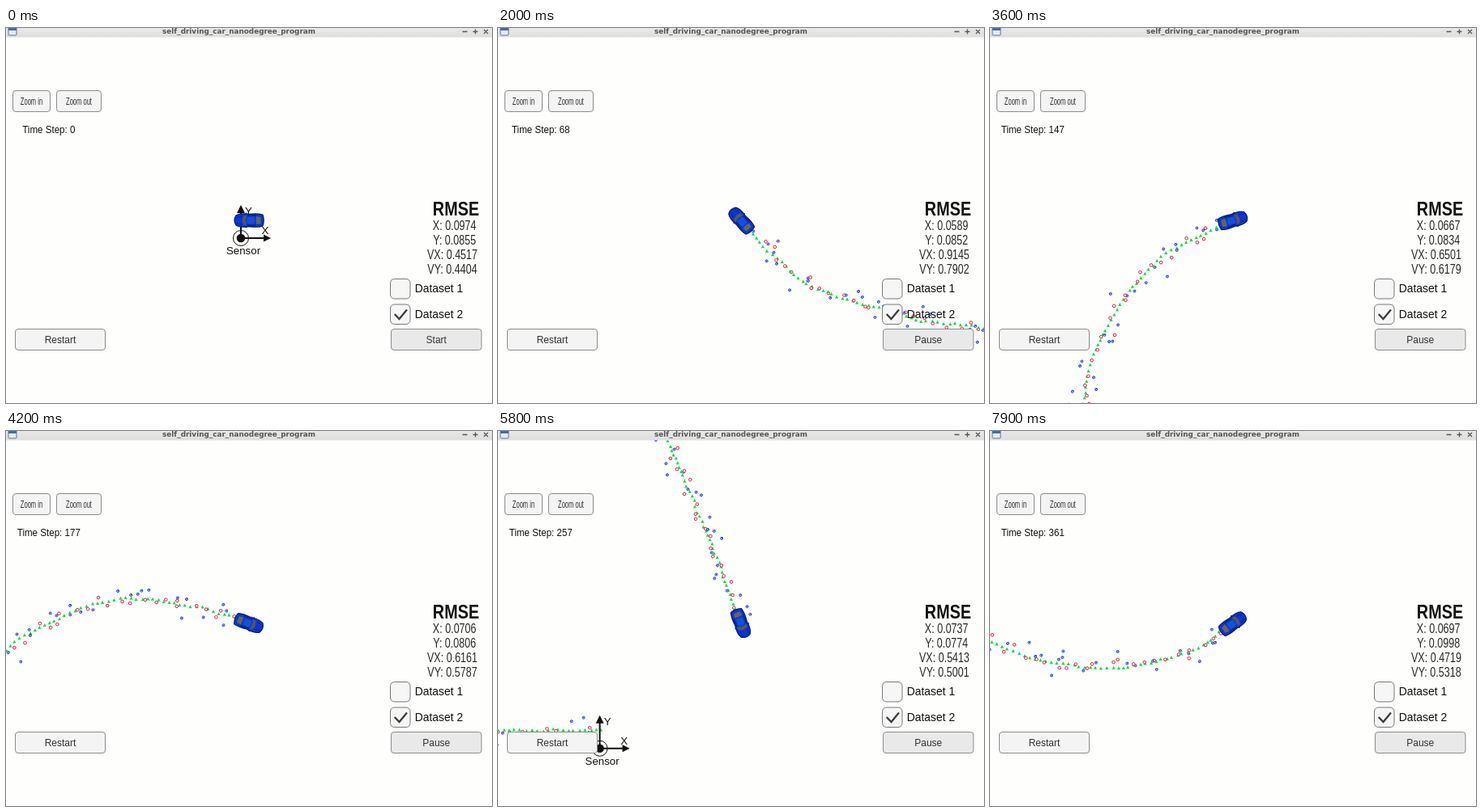
Write an HTML page with a canvas that moves like this. It is 600 by 464 pixels and loops after 8000 ms.

```html
<!DOCTYPE html>
<html lang="en">
<head>
<meta charset="utf-8">
<title>Sensor fusion simulator</title>
<style>
html, body { margin: 0; width: 100%; height: 100%; overflow: hidden; background: #fefefc; }
canvas { display: block; width: 600px; height: 464px; }
</style>
</head>
<body>
<canvas id="stage"></canvas>
<script>
const W = 600, H = 464, LOOP = 8000, FRAME = 100, LAST = 361;
const SANS = '"Liberation Sans", Arial, sans-serif';
const PAPER = '#fefefc', INK = '#111', GREEN = '#16d84c', RED = '#e6123e', BLUE = '#1230d0';
const CAR = { x: 300, y: 238 }, SENSOR = { x: -10, y: 22 };

const canvas = document.getElementById('stage');
const dpr = window.devicePixelRatio || 1;
canvas.width = W * dpr;
canvas.height = H * dpr;
const ctx = canvas.getContext('2d');

// [ms, time step, error of x, y, vx, vy]
const log = [
  [0, 0, .0974, .0855, .4517, .4404],
  [1400, 38, .0553, .0767, 1.0819, .852],
  [2700, 104, .0632, .0952, .7192, .7181],
  [3600, 147, .0667, .0834, .6501, .6179],
  [4900, 214, .0752, .0774, .5764, .533],
  [6700, 301, .0722, .0774, .5061, .4672],
  [7900, LAST, .0697, .0998, .4719, .5318]];

// [time step, x, y] way points of the drive
const path = [
  [0, 0, 0], [20, -137, -1], [38, -257, -24], [53, -353, -60], [67, -424, -128],
  [82, -485, -209], [104, -506, -354], [121, -465, -465], [133, -409, -529],
  [147, -321, -576], [160, -233, -582], [183, -83, -538], [199, 1, -465], [214, 60, -382],
  [238, 122, -243], [262, 176, -103], [279, 221, 4], [301, 314, 123], [314, 385, 175],
  [326, 460, 205], [340, 555, 208], [353, 641, 186], [LAST, 685, 156]];

function segment(list, s) {
  let i = 0;
  while (i < list.length - 2 && s > list[i + 1][0]) i++;
  return i;
}

// All logged values at time t; the first stretch starts slowly.
function readLog(t) {
  const i = segment(log, t), a = log[i], b = log[i + 1];
  const u = Math.min(1, (t - a[0]) / (b[0] - a[0]));
  const [, step, ...errors] = a.map((v, k) => v + (b[k] - v) * (i ? u : u * u));
  return { step: Math.floor(step + 1e-6), errors };
}

function slope(i, col) {
  const a = path[Math.max(0, i - 1)], b = path[Math.min(path.length - 1, i + 1)];
  return (b[col] - a[col]) / (b[0] - a[0]);
}

function spline(s, col) {
  const i = segment(path, s), a = path[i], b = path[i + 1];
  const d = b[0] - a[0], u = (s - a[0]) / d, v = 1 - u;
  return v * v * (1 + 2 * u) * a[col] + u * u * (3 - 2 * u) * b[col] +
    u * v * d * (v * slope(i, col) - u * slope(i + 1, col));
}

const place = s => ({ x: spline(s, 1), y: spline(s, 2) });

function heading(s) {
  const a = place(Math.max(0, s - 1)), b = place(Math.min(LAST, s + 1));
  return Math.atan2(b.y - a.y, b.x - a.x);
}

function randoms(seed) {
  return () => {
    seed = (seed + 0x6D2B79F5) | 0;
    let t = Math.imul(seed ^ (seed >>> 15), 1 | seed);
    t = (t + Math.imul(t ^ (t >>> 7), 61 | t)) ^ t;
    return ((t ^ (t >>> 14)) >>> 0) / 4294967296;
  };
}

// Measurements alternate between lidar and radar; the estimate drifts slowly.
const random = randoms(29);
const gauss = () => (random() + random() + random() + random() - 2) * 1.73;
const marks = [];
let ex = 0, ey = 0;
for (let i = 1; i <= LAST; i++) {
  const p = place(i), radar = i % 2 === 0, spread = radar ? 10 : 4.3;
  ex = ex * .75 + gauss() * .9;
  ey = ey * .75 + gauss() * .9;
  marks.push({ radar, x: p.x + gauss() * spread, y: p.y + gauss() * spread,
    gx: p.x + ex, gy: p.y + ey });
}

function text(str, x, y, size, { color = INK, weight = '', narrow = 1, font = SANS } = {}) {
  ctx.save();
  ctx.translate(x, y);
  ctx.scale(narrow, 1);
  ctx.font = `${weight} ${size}px ${font}`;
  ctx.textAlign = 'center';
  ctx.fillStyle = color;
  ctx.fillText(str, 0, 0);
  ctx.restore();
}

function paint(fill, stroke, width = 1) {
  if (fill) { ctx.fillStyle = fill; ctx.fill(); }
  if (stroke) { ctx.strokeStyle = stroke; ctx.lineWidth = width; ctx.stroke(); }
}

function box(x, y, w, h, r, fill, stroke) {
  ctx.beginPath();
  ctx.roundRect(x, y, w, h, r);
  paint(fill, stroke);
}

function disc(x, y, r, fill, stroke) {
  ctx.beginPath();
  ctx.arc(x, y, r, 0, Math.PI * 2);
  paint(fill, stroke);
}

function poly(points, fill) {
  ctx.beginPath();
  points.forEach(([x, y]) => ctx.lineTo(x, y));
  ctx.closePath();
  paint(fill);
}

function lines(color, width, ...runs) {
  ctx.beginPath();
  for (const run of runs) run.forEach(([x, y], i) => i ? ctx.lineTo(x, y) : ctx.moveTo(x, y));
  paint(null, color, width);
}

function drawErrors(errors) {
  text('RMSE', 555.5, 232, 24.5, { weight: 'bold', narrow: .81 });
  ['X', 'Y', 'VX', 'VY'].forEach((name, i) => {
    const x = i < 2 ? 553.7 : 551, y = 249.7 + i * 18.1;
    text(`${name}: ${errors[i].toFixed(4)}`, x, y, 16.3, { color: '#282828', narrow: .77 });
  });
}

function drawSensor(x, y) {
  ctx.save();
  ctx.translate(x, y);
  disc(0, 0, 9.5, PAPER, INK);
  lines(INK, 2, [[0, 0], [0, -33]], [[0, 0], [30, 0]]);
  poly([[0, -41], [-5, -31], [5, -31]], INK);
  poly([[37, 0], [28, -4.5], [28, 4.5]], INK);
  disc(0, 0, 5.3, INK);
  text('Sensor', 3, 20, 13.3);
  text('X', 30, -5, 13.3);
  text('Y', 9.5, -29, 13.3);
  ctx.restore();
}

function drawTrail(step, ox, oy) {
  for (const m of marks.slice(0, step)) {
    const x = m.x + ox, y = m.y + oy, gx = m.gx + ox, gy = m.gy + oy;
    poly([[gx, gy - 2.2], [gx - 2.1, gy + 1.8], [gx + 2.1, gy + 1.8]], GREEN);
    disc(x, y, m.radar ? 1.5 : 1.8, PAPER, m.radar ? BLUE : RED);
    if (m.radar) lines(BLUE, 1, [[x - .5, y + .5], [x + 1.2, y - 1.2]]);
  }
}

function drawCar(angle) {
  ctx.save();
  ctx.translate(CAR.x, CAR.y);
  ctx.rotate(angle);
  box(2.5, -9.5, 2, 19, 1, '#0b2a9a');
  ctx.beginPath();
  ctx.moveTo(-17, -7);
  ctx.quadraticCurveTo(-10, -9, 0, -7.7);
  ctx.quadraticCurveTo(11, -9.3, 16, -6);
  ctx.quadraticCurveTo(20, 0, 16, 6);
  ctx.quadraticCurveTo(11, 9.3, 0, 7.7);
  ctx.quadraticCurveTo(-10, 9, -17, 7);
  ctx.quadraticCurveTo(-19.5, 0, -17, -7);
  paint('#0a37d2', '#071b6c', 1.2);
  for (const side of [-1, 1]) {
    lines('#0a259c', 1, [[9, 5 * side], [16, 3.5 * side]]);
    lines('#0a206e', 1.2, [[-9, 6.5 * side], [2, 6 * side]]);
  }
  poly([[3, -6.5], [7, -5.5], [8.5, 0], [7, 5.5], [3, 6.5], [4, 0]], '#55565c');
  poly([[-14.5, -4], [-9, -5], [-8.5, 0], [-9, 5], [-14.5, 4]], '#66645c');
  box(-7, -4.3, 9.5, 8.6, 2, '#1450d8');
  ctx.restore();
}

function drawTitle() {
  const shade = ctx.createLinearGradient(0, 0, 0, 11.5);
  shade.addColorStop(0, '#e8e8e8');
  shade.addColorStop(1, '#dedede');
  ctx.fillStyle = shade;
  ctx.fillRect(0, 0, W, 11.5);
  text('self_driving_car_nanodegree_program', 287.5, 7.3, 8.85,
    { weight: 'bold', color: '#555', font: '"DejaVu Sans", sans-serif' });
  box(3, -1, 10, 10, 1, '#e8ebf0', '#5878a4');
  box(3, 0, 10, 3, 0, '#3f6bab');
  lines('#555', 1.3, [[563.5, 4.5], [569.5, 4.5]],
    [[576.5, 4.5], [582.5, 4.5]], [[579.5, 1.5], [579.5, 7.5]],
    [[590, 2], [595, 7]], [[595, 2], [590, 7]]);
}

function button(label, x, y, w, { narrow = 1, fill = '#f4f4f4' } = {}) {
  box(x, y, w, 26, 3.5, fill, '#8c8c8c');
  text(label, x + w / 2, y + 17.5, 12, { color: '#323232', narrow });
}

function drawControls(step) {
  button('Zoom in', 8.5, 77.5, 46, { narrow: .63 });
  button('Zoom out', 62.5, 77.5, 55, { narrow: .63 });
  button('Restart', 11.5, 372.5, 111);
  button(step ? 'Pause' : 'Start', 475.5, 372.5, 111.5, { fill: '#e9e9e9' });
  text(`Time Step: ${step}`, 52.8, 129.5, 12.4, { narrow: .935 });
  for (const n of [1, 2]) {
    const y = 279 + n * 31.5;
    box(474.5, y, 24.5, 24.5, 5, '#f6f6f6', '#777');
    text(`Dataset ${n}`, 534.4, y + 16.5, 13.9);
  }
  lines('#3c3c3c', 2.3, [[479.7, 354], [485.5, 360], [495, 348.5]]);
}

function draw(now) {
  const t = Math.floor((now % LOOP) / FRAME) * FRAME;
  const { step, errors } = readLog(t);
  const p = place(step), ox = CAR.x - p.x, oy = CAR.y - p.y;
  ctx.setTransform(dpr, 0, 0, dpr, 0, 0);
  ctx.fillStyle = PAPER;
  ctx.fillRect(0, 0, W, H);
  drawErrors(errors);
  drawTrail(step, ox, oy);
  drawSensor(SENSOR.x + ox, SENSOR.y + oy);
  drawCar(heading(step));
  drawControls(step);
  drawTitle();
}

let start;
function tick(now) {
  start ??= now;
  draw(now - start);
  requestAnimationFrame(tick);
}
draw(0);
requestAnimationFrame(tick);
</script>
</body>
</html>
```
